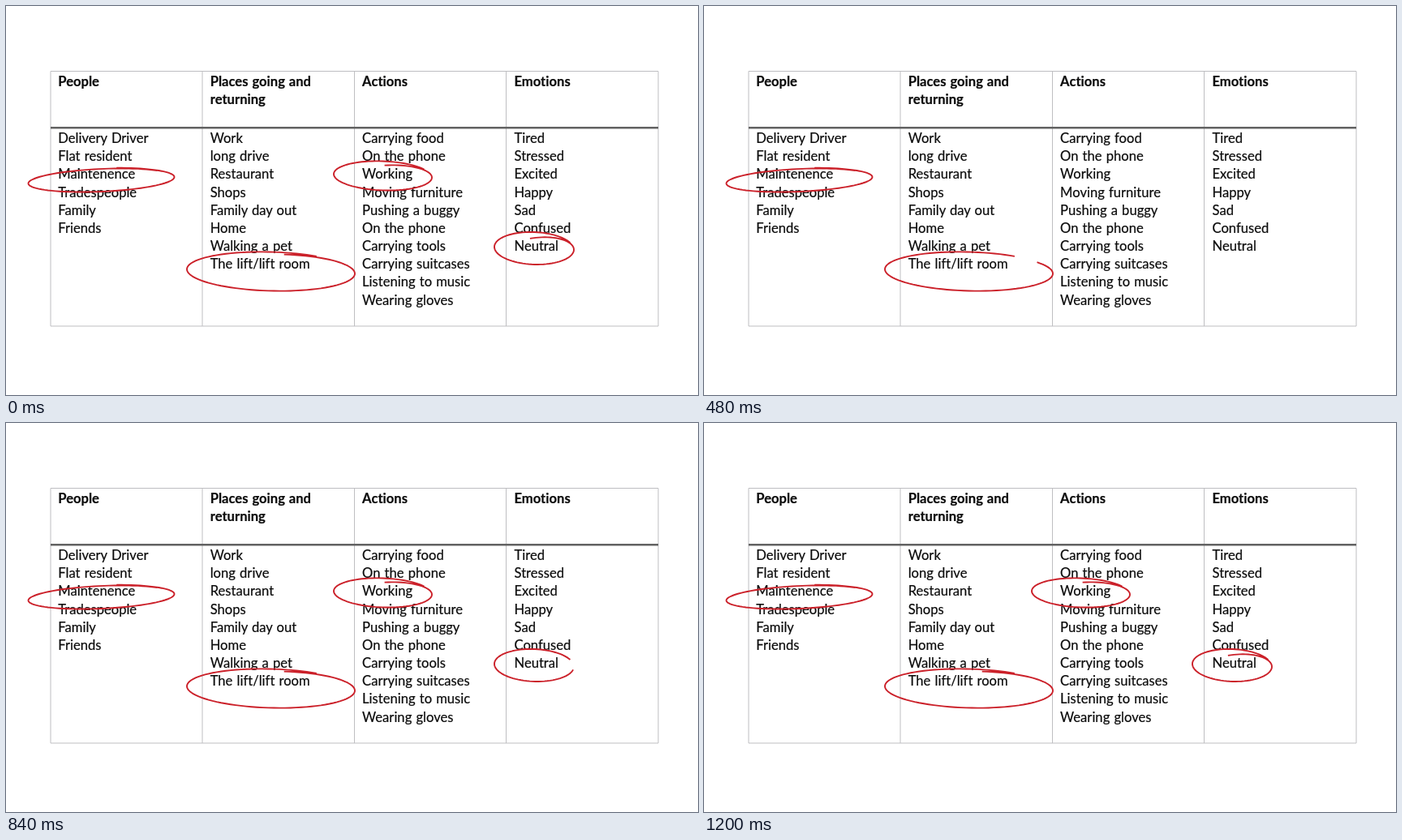
These frames come from a looping animation (853 by 480 pixels, 1400 ms). An HTML page:

```html
<!DOCTYPE html>
<html lang="en">
<head>
<meta charset="utf-8">
<title>Story word table</title>
<style>
  html, body { margin: 0; width: 100%; height: 100%; overflow: hidden; background: #fff; }
  svg { display: block; width: 853px; height: 480px; }
  text {
    font: 16.6px Lato, "Open Sans", sans-serif; font-variant-ligatures: none; word-spacing: .9px;
    fill: #0c0c0c; stroke: #0c0c0c; stroke-width: .2;
  }
  .head { font-weight: 700; }
  .grid { fill: none; stroke: #bebec1; }
  .rule { stroke: #626262; stroke-width: 2.4; }
  .pen { fill: none; stroke: #cb2029; stroke-width: 1.9; stroke-linejoin: round; }
</style>
</head>
<body>
<svg viewBox="0 0 853 480">
  <path class="grid" d="M55 80.5H804V395H55ZM242 80V395M429.5 80V395M616.5 80V395"/>
  <path class="rule" d="M55 150.2H804"/>
</svg>
<script>
const LOOP = 1400, STEP = 60, LAST = 1200;
const LEFT = 64.3, COLUMN = 187.4, LINE = 22.17;
const svg = document.querySelector('svg');

const columns = [
  ['People', 'Delivery Driver|Flat resident|Maintenence|Tradespeople|Family|Friends'],
  ['Places going and|returning', 'Work|long drive|Restaurant|Shops|Family day out|Home|Walking a pet|The lift/lift room'],
  ['Actions', 'Carrying food|On the phone|Working|Moving furniture|Pushing a buggy|On the phone|Carrying tools|Carrying suitcases|Listening to music|Wearing gloves'],
  ['Emotions', 'Tired|Stressed|Excited|Happy|Sad|Confused|Neutral']
];

// Angles in degrees; drift is how far the closing end strays from the ellipse
const loops = [
  { start: 60, duration: 216, cx: 117.5, cy: 215, rx: 90, ry: 14, tilt: -2.5, from: 40, sweep: 398, drift: .06 },
  { start: 293, duration: 212, cx: 326.5, cy: 327.5, rx: 103.5, ry: 24, tilt: 1.5, from: 57, sweep: 384, drift: -.1 },
  { start: 538, duration: 165, cx: 464.5, cy: 209.5, rx: 60.5, ry: 18, tilt: 2, from: 32, sweep: 416, drift: -.28 },
  { start: 716, duration: 165, cx: 651, cy: 299, rx: 49, ry: 20, tilt: 2, from: 25, sweep: 431, drift: -.4 }
];

function add(tag, attributes, content = '') {
  const node = document.createElementNS(svg.namespaceURI, tag);
  for (const key in attributes) node.setAttribute(key, attributes[key]);
  node.textContent = content;
  return svg.appendChild(node);
}

function addLines(x, y, lines, style) {
  lines.split('|').forEach((line, i) => add('text', { x, y: y + i * LINE, class: style }, line));
}

function loopPoint({ cx, cy, rx, ry, tilt, from, sweep, drift }, t) {
  const angle = (from + sweep * t) * Math.PI / 180;
  const x = rx * Math.cos(angle);
  const y = -ry * Math.sin(angle) * (1 + drift * t ** 8);
  const slope = Math.tan(tilt * Math.PI / 180);
  return [cx + x, cy + y + x * slope];
}

function loopPath(loop, part) {
  if (part <= 0) return '';
  const count = Math.ceil(100 * part);
  const points = Array.from({ length: count + 1 }, (_, i) => loopPoint(loop, part * i / count));
  return 'M' + points.join('L');
}

columns.forEach(([head, body], i) => {
  const x = LEFT + i * COLUMN;
  addLines(x, 98.5, head, 'head');
  addLines(x, 169, body, 'body');
});

const pens = loops.map(() => add('path', { class: 'pen' }));

// The loop opens on the finished drawing, then starts over
function draw(now) {
  const time = Math.min(LAST, Math.floor(now % LOOP / STEP) * STEP) || LAST;
  loops.forEach((loop, i) => {
    const part = Math.min(1, (time - loop.start) / loop.duration);
    pens[i].setAttribute('d', loopPath(loop, part));
  });
}

function frame() {
  draw(performance.now());
  requestAnimationFrame(frame);
}
frame();
</script>
</body>
</html>
```
